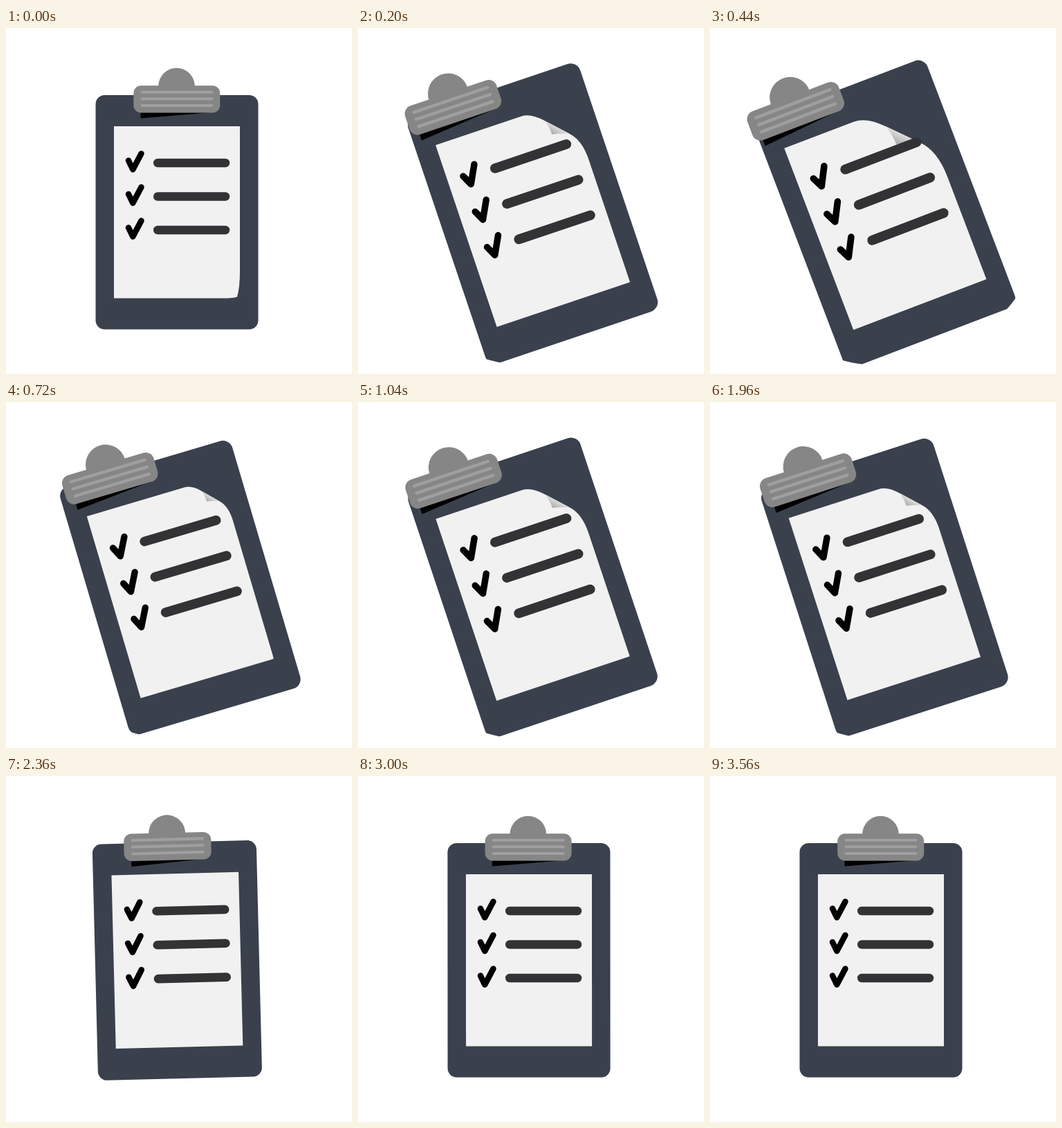
These frames come from a looping animation (500 by 500 pixels, 3.6 s). An HTML page:

```html
<!DOCTYPE html>
<html lang="en">
<head>
<meta charset="utf-8">
<title>Checklist clipboard</title>
<style>
  html, body { margin: 0; width: 100%; height: 100%; overflow: hidden; background: #fff; }
  svg { display: block; width: 100%; height: 100%; }
</style>
</head>
<body>
<svg viewBox="0 0 500 500">
  <defs>
    <clipPath id="lens"><circle cx="250" cy="250" r="237.7"/></clipPath>
    <linearGradient id="shade" gradientUnits="userSpaceOnUse" x1="-33" y1="33" x2="-22" y2="23">
      <stop offset="0" stop-color="#a2a2a2"/>
      <stop offset="1" stop-color="#ececec"/>
    </linearGradient>
    <g id="item" fill="none" stroke-linecap="round">
      <path d="M177 191.5L183.3 204.5L195.5 181.5" stroke="#000" stroke-width="8.5" stroke-linejoin="round"/>
      <path d="M219.2 195H317" stroke="#333335" stroke-width="12.5"/>
    </g>
  </defs>
  <g clip-path="url(#lens)">
    <g id="board">
      <rect x="129.5" y="97" width="235" height="338.5" rx="13" fill="#3a414d"/>
      <path id="paper" fill="#f1f1f1"/>
      <path id="flap" d="M-35 14Q-32 23 -32 32Q-22 34 -12 38Z" fill="url(#shade)"/>
      <use href="#item"/>
      <use href="#item" y="48.5"/>
      <use href="#item" y="97"/>
      <g id="clamp">
        <path d="M194.5 118V130.5L303 121.5V118Z"/>
        <g fill="#868686">
          <circle cx="246.5" cy="84" r="26.3"/>
          <rect x="184.3" y="83.3" width="125" height="39.2" rx="11"/>
        </g>
        <path d="M196.5 92.7H297.5M196.5 102.3H297.5M196.5 112H297.5" stroke="#9f9f9f" stroke-width="4" stroke-linecap="round"/>
      </g>
    </g>
  </g>
</svg>
<script>
const LOOP = 3600, SWING_START = 40, RETURN_START = 1960;
const [board, paper, flap, clamp] = ["board", "paper", "flap", "clamp"].map(id => document.getElementById(id));

const elasticOut = u => u <= 0 ? 0 : 1 + 2 ** (-10 * u) * Math.sin((10 * u - 0.75) * 2 * Math.PI / 3);
const expoFall = u => 2 ** (-10 * u);

// q sizes the turned top right corner, b the bent bottom right one
function paperPath(q, b) {
  const top = (x, y) => `${338 + x * q} ${142 + y * q} `;
  const low = (x, y) => `${338 + x * b} ${390.5 + y * b} `;
  return `M156 142L${top(-60, 0)}Q${top(-48, 0)}${top(-35, 14)}L${top(-12, 38)}Q${top(0, 50)}${top(0, 75)}` +
    `L${low(0, -40)}Q${low(0, -15)}${low(-4, -2)}Q${low(-10, 0)}${low(-24, 0)}L156 390.5Z`;
}

function draw(t) {
  const returning = t >= RETURN_START;
  const swing = elasticOut((t - SWING_START) / 2070);
  const tilt = returning ? expoFall((t - RETURN_START) / 1100) : swing;
  const slide = returning ? expoFall((t - RETURN_START) / 1640) : swing;
  const curl = Math.max(0, tilt) ** 2.5;
  const bend = returning ? 0 : Math.max(0, 1 - swing);

  board.setAttribute("transform",
    `translate(250 250) rotate(${-18 * tilt}) scale(${1 + 0.112 * tilt}) translate(-250 -250)`);
  clamp.setAttribute("transform", `translate(${-52 * slide} 0)`);
  paper.setAttribute("d", paperPath(curl, bend));
  flap.setAttribute("transform", `translate(338 142) scale(${curl})`);
}

const start = performance.now();
function tick() {
  draw((performance.now() - start) % LOOP);
  requestAnimationFrame(tick);
}
tick();
</script>
</body>
</html>
```
